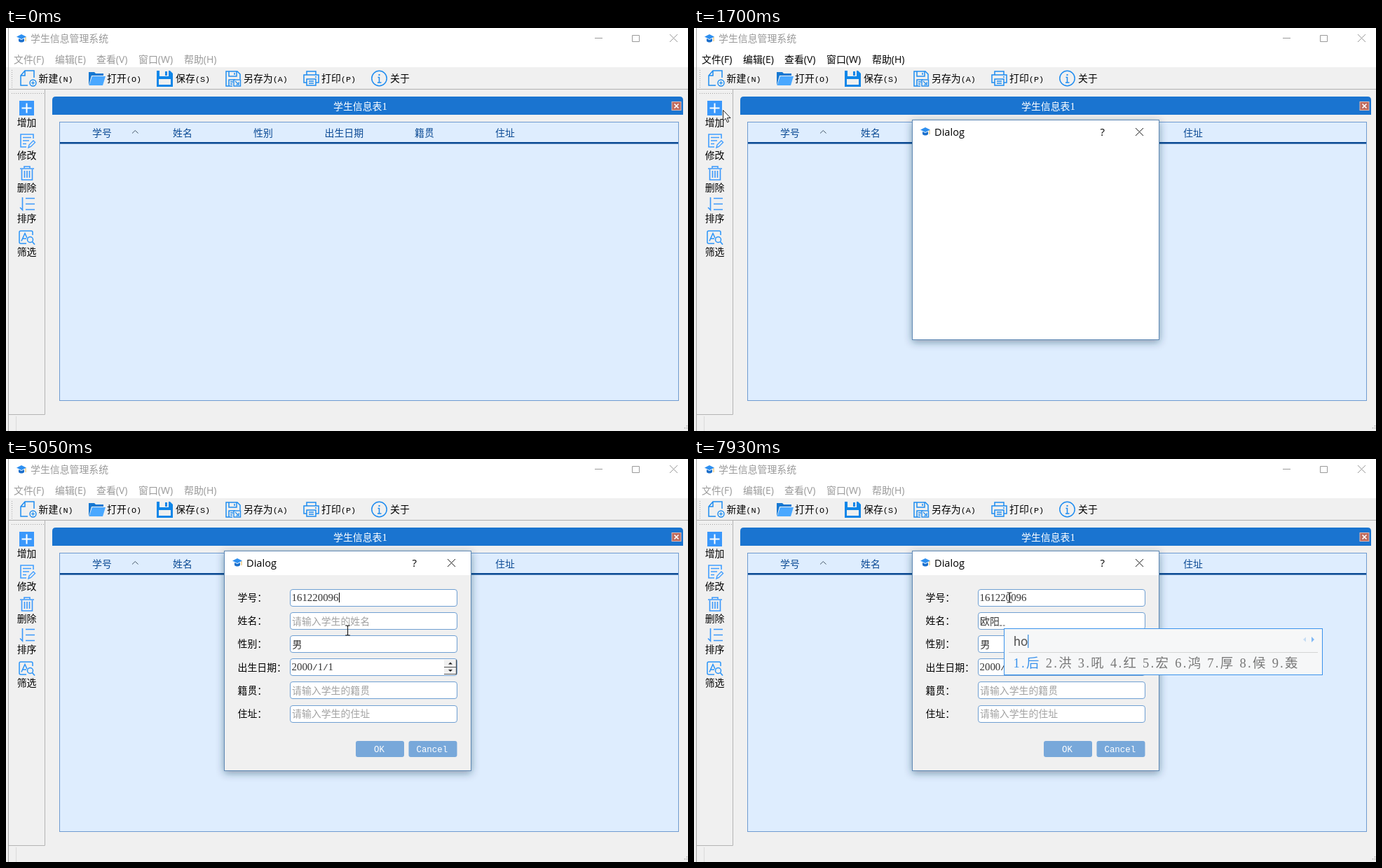
Recreate the animation shown at these times as an HTML page. Size 973 by 576 pixels, loop 8000 ms.

```html
<!DOCTYPE html>
<html lang="zh-CN">
<head>
<meta charset="utf-8">
<title>学生信息管理系统</title>
<style>
html, body { margin: 0; width: 100%; height: 100%; overflow: hidden; background: #f0f0f0; }
svg { display: block; width: 973px; height: 576px; }
text { white-space: pre; }
.cjk { font-family: "Noto Sans CJK SC", "Noto Sans CJK", sans-serif; }
.mono { font-family: "Liberation Mono", monospace; }
.digits { font-family: "Liberation Serif", serif; }
.ui { font-family: "Open Sans", sans-serif; }
</style>
</head>
<body>
<svg id="stage" viewBox="0 0 973 576" xmlns="http://www.w3.org/2000/svg"></svg>
<script>
const LOOP = 8000;
const BLUE = '#1e8cf0', NAVY = '#0b4a94', DIM = '#9a9a9a', EDGE = '#6f9fd2';

const attrs = o => Object.entries(o).map(([k, v]) => ` ${k}="${v}"`).join('');
const rect = (x, y, width, height, fill, more = {}) =>
  `<rect${attrs({ x, y, width, height, fill, ...more })}/>`;
const line = (d, stroke, w = 1, more = {}) =>
  `<path${attrs({ d, stroke, 'stroke-width': w, fill: 'none', ...more })}/>`;
const shape = (d, fill) => `<path d="${d}" fill="${fill}"/>`;
const group = (id, inner, more = {}) => `<g${attrs({ id, ...more })}>${inner}</g>`;

// Chinese, Latin and digit runs have their own font; serif digits at 1.2 times the size keep the mono pitch.
function runs(str, size, latin, latinSize) {
  return str.replace(/[0-9]+|[\x20-\x2f\x3a-\x7e]+|[^\x20-\x7e]+/g, run => {
    const digits = latin === 'mono' && /^[0-9]/.test(run);
    const [name, px] = digits ? ['digits', latinSize * 1.2]
      : /^[\x20-\x7e]/.test(run) ? [latin, latinSize] : ['cjk', size];
    return `<tspan class="${name}" font-size="${px}">${run}</tspan>`;
  });
}
const text = (x, y, str, fill = '#000', { size = 13.9, latin = 'mono', latinSize = 12.4, ...more } = {}) =>
  `<text${attrs({ x, y, fill, ...more })}>${runs(str, size, latin, latinSize)}</text>`;
const uiText = (x, y, str, fill, size = 14) => text(x, y, str, fill, { latin: 'ui', latinSize: size });

const cap = (x, y) => `<g transform="translate(${x} ${y})">` +
  shape('M0 3.5 7 0 14 3.5 7 7z', '#2d8ff0') +
  shape('M3 6 7 8 11 6V10Q7 13 3 10z', '#1b6fcb') +
  line('M13 4V10', '#e0b04c') + '</g>';
const cross = (x, y, s, color, w = 1) => line(`M${x} ${y}l${s} ${s}m0 ${-s}l${-s} ${s}`, color, w);

function titleBar() {
  return rect(0, 0, 973, 56, '#fff') + cap(15, 9) +
    group('title', uiText(35, 20, '学生信息管理系统', 'currentColor') +
      line('M840 14.5H851M893.5 10.5H903.5V19.5H893.5Z', 'currentColor') +
      cross(947, 9, 11, 'currentColor')) +
    group('menu', [[11, '文件(F)'], [70, '编辑(E)'], [129, '查看(V)'], [189, '窗口(W)'], [254, '帮助(H)']]
      .map(([x, s]) => uiText(x, 49.5, s, 'currentColor')).join(''));
}

function toolbar() {
  const icons =
    line('M31 82H21V68L27 61H40V71M21 68H27V61', BLUE, 1.5) +
    `<circle cx="38.5" cy="78.5" r="4.5" fill="#f0f0f0" stroke="${BLUE}" stroke-width="1.4"/>` +
    line('M36 78.5H41M38.5 76V81', BLUE, 1.2) +
    shape('M118 82V63H126L128 65H139V68H122z', '#1678d2') + shape('M123 69H142L138 82H118.5z', '#4aa8ff') +
    shape('M215 61H234L238 65V84H215z', '#0f86e8') +
    rect(219, 61, 13, 8, '#f0f0f0') + rect(227, 62, 3, 6, '#0f86e8') + rect(218, 73, 17, 8, '#f0f0f0') +
    line('M323 83H314V62H330L334 66V73M318 62V69H329V62M326 64V67M318 83V74H327M320 77H324M320 80H323', BLUE, 1.5) +
    rect(325, 74, 9.5, 9, '#f0f0f0', { stroke: BLUE, 'stroke-width': 1.4 }) + line('M327 76L332 81M332 77V81H328', BLUE, 1.2) +
    line('M429 67V62H442V67M429 78H425V67H446V78H442M429 73H442V82H429ZM432 76H439M432 79H439M441 70H443', BLUE, 1.5) +
    `<circle cx="532.5" cy="72" r="10.7" fill="none" stroke="${BLUE}" stroke-width="1.5"/>` +
    rect(531.5, 66, 2, 2, BLUE) + line('M530.5 70.5H532.5V77.5M530 78H535.5', BLUE, 1.5);
  const labels = [[46.5, '新建(N)'], [144, '打开(O)'], [242, '保存(S)'], [339, '另存为(A)'], [450, '打印(P)'], [548, '关于']];
  return rect(0, 56, 973, 520, '#f0f0f0') + line('M4 87.5H973', '#b0b0b0') +
    line('M8.5 60V86', '#a8a8a8', 1, { 'stroke-dasharray': '1 2' }) +
    icons + labels.map(([x, s]) => text(x, 77, s, '#000', { latinSize: 11.8 })).join('');
}

function sidebar() {
  const add = rect(19, 104, 21, 21, '#3a98fb') + line('M22.5 114.5H36.5M29.5 107.5V121.5', '#fff', 2);
  const edit = line('M39 158V152H21V170H29M24 156.5H36M24 161H33M24 165.5H29', '#409eff', 1.6) +
    line('M32 171L33 167 39 161 41.5 163.5 35.5 169.5Z', '#409eff', 1.4);
  const bin = line('M20 201H40M26 200V198H34V200M22.5 202V217H37.5V202M26.5 204V214M30 204V214M33.5 204V214', '#3a98fb', 1.6);
  const sort = line('M23.5 242V260L20 256.5', '#3a98fb', 1.6) + line('M28 243.5H41M28 251.5H41M28 259.5H41', '#3a98fb', 1.7);
  const filter = line('M29 308H21Q19 308 19 306V292Q19 290 21 290H36Q38 290 38 292V296', '#2a94f8', 1.5) +
    line('M22 304.5L27 293.5 30 300M24 301H29', '#2a94f8', 1.5) +
    '<circle cx="34.5" cy="302.5" r="4" fill="none" stroke="#2a94f8" stroke-width="1.5"/>' + line('M37.5 305.5L41 309.5', '#2a94f8', 1.6);
  const label = (y, s) => text(15.7, y, s);
  return line('M14.5 555V576', '#dadada') + line('M4 552.5H55.5V88', '#b4b4b4') +
    line('M8 93.5H54', '#a0a0a0', 1, { 'stroke-dasharray': '1 2' }) +
    rect(6.5, 99.5, 47, 45, '', { id: 'hoverAdd' }) + rect(6.5, 145.5, 47, 45, '#d8e6f2', { id: 'hoverEdit', stroke: '#c0dcf3' }) +
    group('add', add + label(139.5, '增加')) + edit + label(186.5, '修改') +
    bin + label(232.5, '删除') + sort + label(276.5, '排序') + filter + label(324.5, '筛选') +
    line('M971.5 568V574M968.5 571V574', '#b0b0b0', 1.5, { 'stroke-dasharray': '1.5 1.5' });
}

function sheet() {
  const heads = [[123, '学号'], [238, '姓名'], [353, '性别'], [454.5, '出生日期'], [583, '籍贯'], [698, '住址']];
  return shape('M66 124V103Q66 98 71 98H961Q966 98 966 103V124z', '#1a74d0') +
    text(467, 117, '学生信息表1', '#fff') +
    rect(950, 105.5, 13, 12, '#c06a5c', { stroke: '#e0b8b0' }) + cross(953.5, 108.5, 6, '#fff', 1.7) +
    rect(76.5, 134.5, 883, 398, '#deedfe', { stroke: '#6f9bd0' }) + rect(77, 163, 882, 2.6, NAVY) +
    heads.map(([x, s]) => text(x, 154.5, s, NAVY)).join('') +
    line('M180 150.5L184.3 146.5 188.6 150.5', '#46586c');
}

function dialog() {
  const row = i => 186.5 + i * 33.1;
  const labels = ['学号：', '姓名：', '性别：', '出生日期：', '籍贯：', '住址：'];
  const hints = { 0: '学号', 1: '姓名', 4: '籍贯', 5: '住址' };
  const fields = labels.map((s, i) =>
    text(330.5, row(i) + 16.7, s) +
    rect(405.5, Math.floor(row(i)) + 0.5, 238, 24, '#fff', { rx: 3.5, stroke: EDGE }) +
    (hints[i] ? text(408, row(i) + 17, '请输入学生的' + hints[i], '#a2a2a2', { id: 'hint' + i }) : '')).join('');
  const button = (x, tx, s) => rect(x, 403, 69, 23, '#78a8da', { rx: 3 }) + text(tx, 419, s, '#fff');
  const body = rect(312, 166, 351, 279, '#f0f0f0') + fields +
    text(408.5, row(2) + 17, '男', '#333') + text(407.5, row(3) + 16.5, '2000/1/1', '#333') +
    rect(625, 287, 17, 21, '#f0f0f0') + line('M625 297.5H642M625 307.5H642.5V287', '#555', 1.2) +
    shape('M631 293.5H637L634 290.5z', '#222') + shape('M631 301H637L634 304z', '#222') +
    text(407.5, 203, '', '#333', { id: 'number' }) + text(408, 236.5, '欧阳', '#333', { id: 'surname' }) +
    line('M0 238H3.5M5 238H7.5', '#444', 1.2, { id: 'compose' }) +
    rect(0, 0, 1, 14, '#000', { id: 'caret' }) +
    button(499, 525, 'OK') + button(574.5, 585.5, 'Cancel');
  return group('dialog',
    rect(311.5, 131.5, 352, 314, '#fff', { stroke: '#5f88b4', filter: 'url(#shadow)' }) +
    cap(323, 142) + uiText(343, 154, 'Dialog', '#000', 14.6) + uiText(579.5, 154, '?', '#000', 15) +
    cross(630, 143, 11, '#222') + group('body', body));
}

const popup = group('popup',
  rect(0.5, 242.5, 0, 66, '#f6f7f8', { id: 'popupBox', stroke: '#3a92ec' }) +
  line('', '#d4d4d4', 1, { id: 'popupRule' }) +
  '<text id="typed" x="14" y="266.5" fill="#555" font-family="Roboto, sans-serif" font-size="18"></text>' +
  rect(0, 251, 1.2, 19, '#2f86dc', { id: 'typedCaret' }) +
  group('pager', shape('M-28 258L-24 254.5V261.5z', '#c6dcf3') + '<path id="next" d="M-12 258L-16 254V262z"/>') +
  '<text id="choices" x="13.5" y="298" fill="#777"></text>' +
  group('badge', rect(53, 284, 5, 5, '#fff', { stroke: '#3a8de0', rx: 1 }) + line('M54 286.5H57', '#3a8de0')));

const cursors =
  '<path id="arrow" d="M.5.5V15.5L4 12.3 6.5 17.8 8.7 16.8 6.3 11.5H11z" fill="#fff" stroke="#222"/>' +
  line('M-3.5-7H-1L0-6 1-7H3.5M0-6V6M-3.5 7H-1L0 6 1 7H3.5', '#222', 1.2, { id: 'beam' });

stage.innerHTML = `<defs><filter id="shadow" x="-20%" y="-20%" width="140%" height="140%">
  <feDropShadow dx="0" dy="3" stdDeviation="6" flood-color="#1c3550" flood-opacity=".46"/></filter></defs>` +
  titleBar() + toolbar() + sidebar() + sheet() +
  line('M3.5 0V576', '#a8a8a8', 1, { id: 'frame' }) + dialog() + popup + cursors;

const $ = id => document.getElementById(id);
const show = (id, on) => $(id).setAttribute('display', on ? 'inline' : 'none');
const set = (id, o) => { for (const k in o) $(id).setAttribute(k, o[k]); };
const within = (t, a, b) => t >= a && t < b;

const NUMBER = '161220096';
const keyTimes = [3420, 3670, 3820, 4050, 4130, 4360, 4510, 4820, 5050];
const route = [
  [220, 880, 560], [990, 44, 174], [1070, 44, 160], [1220, 43, 118], [1390, 42, 118], [1460, 41, 117],
  [1780, 41, 117], [2410, 467, 198], [2580, 467, 198], [2730, 487.5, 245], [6060, 487.5, 245], [6760, 450, 198]
];
// Each entry: start, end, left, right, typed letters, candidates, badge, has next page
const inputs = [
  [6370, 7070, 414, 752, 'o', '哦 喔 噢 嚄 :-O 笑', true, false],
  [7070, 7450, 414, 1040, 'oy', '欧阳 欧元 偶有 哦呀 欧耶 鸥鸭 欧亚 偶遇 藕叶', false, true],
  [7770, 7930, 442, 912, 'h', '和 好 会 还 很 后 话 或 号', true, true],
  [7930, LOOP, 442, 897, 'ho', '后 洪 吼 红 宏 鸿 厚 候 轰', false, true]
];

function pointerAt(t) {
  const i = route.findIndex(p => p[0] > t);
  if (i < 0) return route[route.length - 1].slice(1);
  const [t0, x0, y0] = route[Math.max(i - 1, 0)], [t1, x1, y1] = route[i];
  const k = Math.max(0, (t - t0) / (t1 - t0));
  return [x0 + (x1 - x0) * k, y0 + (y1 - y0) * k];
}

function drawPopup(input) {
  show('popup', input);
  if (!input) return;
  const [, , left, right, typed, words, badge, more] = input, width = right - left;
  set('popup', { transform: `translate(${left} 0)` });
  set('popupBox', { width: width - 1 });
  set('popupRule', { d: `M7 276.5H${width - 7}` });
  set('pager', { transform: `translate(${width} 0)` });
  set('next', { fill: more ? '#7fb8f5' : '#c6dcf3' });
  if ($('typed').textContent !== typed) {
    $('typed').textContent = typed;
    $('choices').innerHTML = words.split(' ').map((w, i) => {
      const gap = !i && badge ? '  ' : ' ';
      return `<tspan fill="${i ? '#777' : '#3a92ec'}">${runs(i + 1 + '.' + w + gap, 18.4, 'mono', 15.4)}</tspan>`;
    }).join('');
  }
  set('typedCaret', { x: 14 + $('typed').getComputedTextLength() });
  show('badge', badge);
}

function drawCaret(t, count) {
  const second = t >= 5510;
  const reset = [1960, ...keyTimes, 5510, 6370, 7450].filter(k => k <= t).pop();
  const on = Math.floor((t - reset) / 540) % 2 === 0;
  show('caret', reset && on && t < 7770 && !(t >= 6900 && t < 7450));
  const x = !second ? 408 + count * 7.45 : t < 6370 ? 408 : t < 7450 ? 416 : 436;
  set('caret', { x: Math.round(x), y: second ? 224 : 191 });
}

function draw(t) {
  const pressed = within(t, 1630, 1700);
  $('title').style.color = pressed ? '#000' : DIM;
  $('menu').style.color = within(t, 1630, 1780) ? '#000' : DIM;
  set('frame', { stroke: pressed ? '#5f8db8' : '#a8a8a8' });

  const [x, y] = pointerAt(t);
  const overBar = within(t, 220, 1700) && x < 55;
  const beam = t >= 1780 && x > 405;
  show('hoverAdd', overBar && y >= 99 && y < 145);
  show('hoverEdit', overBar && y >= 145 && y < 191);
  set('hoverAdd', { fill: pressed ? '#c0dcf3' : '#d8e6f2', stroke: pressed ? '#90c8f6' : '#c0dcf3' });
  set('add', { transform: pressed ? 'translate(1 1)' : '' });
  show('arrow', t >= 220 && !beam);
  show('beam', beam);
  for (const id of ['arrow', 'beam']) set(id, { transform: `translate(${x} ${y})` });

  show('dialog', t >= 1700);
  show('body', t >= 1780);
  const count = keyTimes.filter(k => k <= t).length;
  $('number').innerHTML = runs(NUMBER.slice(0, count), 13.9, 'mono', 12.4);
  show('hint0', !count);
  show('hint1', t < 6370);
  show('surname', t >= 7450);
  show('compose', within(t, 6370, 7450) || t >= 7770);
  set('compose', { transform: `translate(${t < 7450 ? 408 : 436} 0)` });
  drawCaret(t, count);
  drawPopup(inputs.find(([a, b]) => within(t, a, b)));
}

const start = performance.now();
function tick() {
  draw((performance.now() - start) % LOOP);
  requestAnimationFrame(tick);
}
tick();
</script>
</body>
</html>
```
